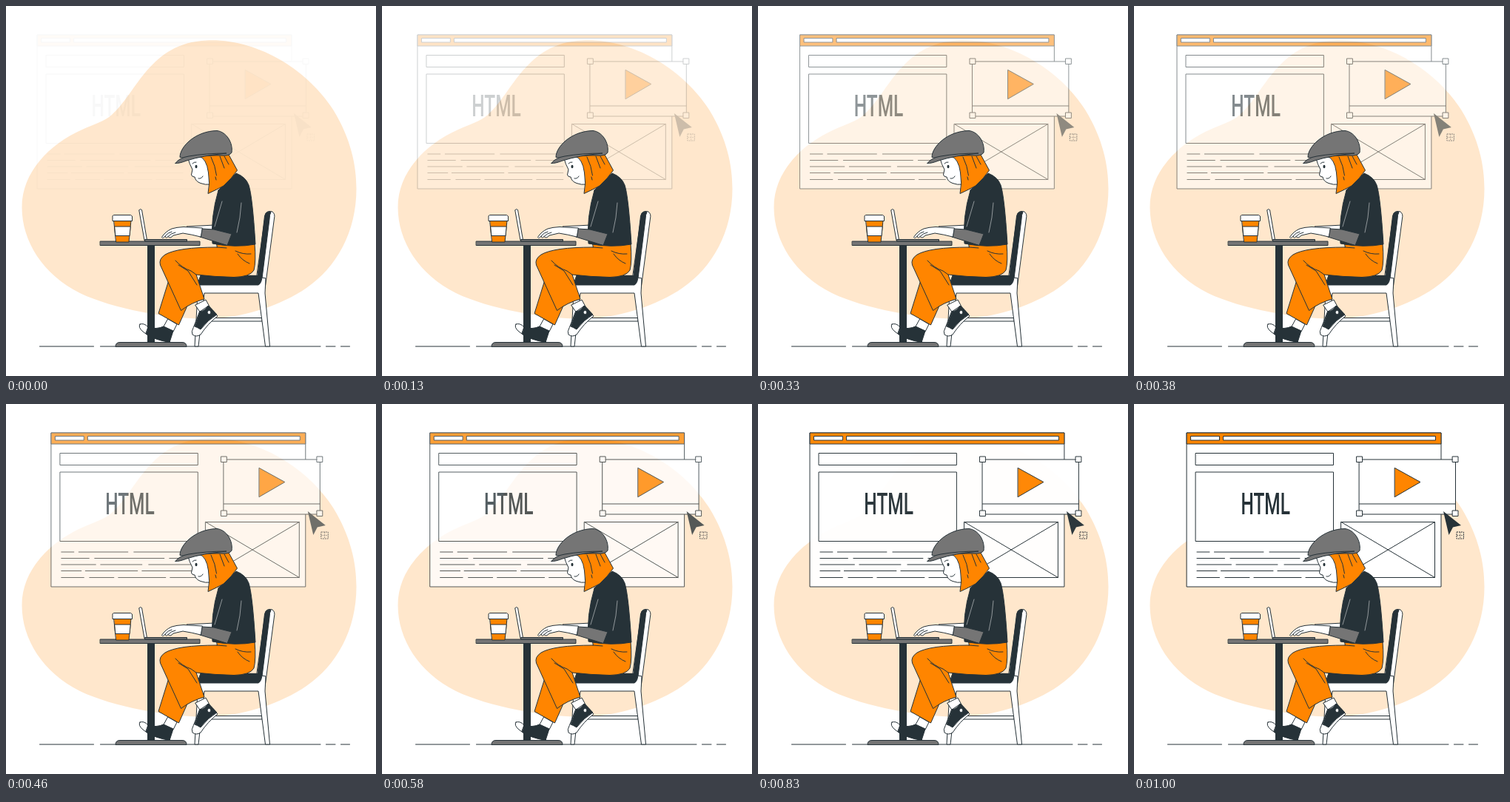
Write an HTML page that moves like this. It is 500 px wide and 500 px high and loops after 1040 ms.

```html
<!DOCTYPE html>
<html lang="en">
<head>
<meta charset="utf-8">
<title>Web designer at work</title>
<style>
  html, body { margin: 0; width: 100%; height: 100%; overflow: hidden; background: #fff; }
  svg { display: block; width: 100vw; height: 100vh; }
  .line { fill: none; stroke: #263238; stroke-width: 1; stroke-linecap: round; stroke-linejoin: round; }
  .white { fill: #fff; }
  .orange { fill: #ff8500; }
  .gray { fill: #757575; }
  .dark { fill: #263238; }
  .bare { stroke: none; }
  .fold { stroke: #fff; stroke-width: .7; stroke-opacity: .7; }
  .dash { stroke-linecap: butt; stroke-dasharray: 2 1; }
  .title { font: 500 40.8px Roboto, "Liberation Sans", sans-serif; fill: #263238; text-anchor: middle; stroke: none; }
</style>
</head>
<body>
<svg viewBox="0 0 500 500">
  <path fill="#ffe7cc" d="M271 46.500C340 43.500 408 87 442 140C466 179 473.500 215 473.500 247C473.500 305 447 353 406 381C371 405 325 419 285 422C240 426 150 412 100 388C50 363 21.500 318 21.500 272C21.500 225 58 187 103 167C118 160 133 156 143 147C177 117 194 50 271 46.500Z"/>

  <g id="page" class="line">
    <path class="white" d="M71.500 39H415V247H71.500Z"/>
    <path class="orange" d="M71.500 39H415V54H71.500Z"/>
    <path class="white" d="M77 43.500H115.500V49H77ZM121 43.500H407.500V49H121Z"/>
    <path d="M83.500 66.500H269.500V82.500H83.500ZM83.500 92H269.500V185.500H83.500Z"/>
    <text class="title" transform="translate(177.700 149) scale(.6 1)">HTML</text>
    <path d="M85 200H102M108.500 200H175M183 200H268M85 208.500H122.500M130 208.500H224M231 208.500H268M85 217H131.500M138 217H194M203 217H268M85 225.500H112M117.500 225.500H188M194 225.500H268M85 234.500H115.500M123 234.500H156M162 234.500H226M232 234.500H268"/>
    <path class="white" d="M280 159.500H406.500V234.500H280ZL406.500 234.500M406.500 159.500L280 234.500"/>
    <path class="white" d="M304.500 75H434.500V149H304.500ZM304.500 135H434.500"/>
    <path class="orange" d="M352.500 86.500L387 105.500L352.500 125.500Z"/>
    <path class="white" d="M301 71H308.500V78.500H301ZM430.500 71H438V78.500H430.500ZM301 144H308.500V151.500H301ZM430.500 144H438V151.500H430.500Z"/>
    <path class="dark bare" d="M418 145L442 164L431 166.500L425.500 177Z"/>
    <path class="dash" d="M436 173H445.500V182H436Z"/>
    <path class="dash" stroke-width=".6" d="M436 177.500H445.500M440.800 173V182"/>
  </g>

  <path class="line" d="M45.500 460H118.500M127.500 460H425M432.500 460H445M452.500 460H464.500"/>

  <g id="chair" class="line">
    <path class="white" d="M264 421.500H346V426H264Z"/>
    <path class="white" d="M351 280Q354 276 360 278Q364 281 362.500 287L350 382L345 385L339 364Z"/>
    <path class="dark" d="M340 364L349.500 284Q351 277 358 278.500Q356 282 356 288L346 368L342 377H258.500L263 364Z"/>
    <path class="white" d="M258 377H341Q345 375 346 367L351 368L350 388L356.500 460H350.500L341 388H268L260 460H255L259 388Z"/>
  </g>

  <g id="woman" class="line">
    <path class="white" d="M181 430Q187 428 192 434L203 439L222 454Q196 450 185 440Q178 434 181 430Z"/>
    <path class="white" d="M219 423L231 430L226 440L213 434Z"/>
    <path class="dark" d="M192 435Q204 437 213 433L226 439L221 454.500Q200 451 189 443Z"/>
    <path class="orange" d="M222 364L206 415.500L233.500 431L258 376Z"/>

    <path class="white" d="M256 404L270 397L276 408L263 414Z"/>
    <path class="white" d="M262 413L274 405L286 419Q273 429 263 444Q257 448 252 444Q250 440 253 435Z"/>
    <path class="dark" d="M262 413Q269 412 273 405Q279 410 285 417Q273 424 263 437Q258 434 255 433Z"/>
    <circle class="white" cx="274.500" cy="414" r="2.500"/>

    <path class="orange" d="M285 322L336 321Q338 345 335 357Q330 366 308 366.500Q282 366 257 363L268 396Q250 401 236.500 411.500L208.500 350Q206 342 215 336Q232 326 285 326Z"/>
    <path d="M229 344Q238 354 250 358L257 363M285 326L298 327M310 331Q320 336 331 335M313 335Q319 344 329 348M233 350L246 358L258 377"/>

    <path class="white" d="M282 296L244 298Q250 305 281 304Z"/>
    <path class="dark" d="M287 249L311 226Q324 231 328 242Q333 257 337 322Q310 327 279 321Q276 286 287 249Z"/>
    <path class="fold" d="M292 264L282 298M318 266Q317 286 312 306"/>
    <path class="gray" d="M265 301L281 302L305 308L299 323.500L262 312Z"/>

    <path class="white" d="M246 206Q248 214 252 221L250.500 228Q251.500 231.500 255 231Q256 237 263 239.500Q270 242 275 241L276 203Z"/>
    <path class="orange" d="M261 203Q271 206 273.500 225Q276 240 273 253.500Q285 248 294 243Q305 233 312.500 222L301 201Z"/>
    <path d="M277 204Q283 216 284.500 229M289 203L295 219M295 203L301 214M283 231L284 235"/>
    <ellipse class="dark bare" cx="257" cy="217" rx="1.500" ry="2.200"/>
    <path d="M252 213Q254 210.500 257 211M260 233Q264 234 266 230"/>
    <path class="gray" d="M235 204C235 190 256 169 285 168.500C298 170 307 185 305 198Q302 203 291 202Q264 201 246 206Z"/>
    <path class="gray" d="M229 212.500Q234 205 247 203Q270 199 298 199Q266 202 244 209Q234 213 229 212.500Z"/>
  </g>

  <g id="desk" class="line">
    <path class="dark bare" d="M191 323H201V456H191Z"/>
    <path class="gray" d="M148 460Q148 454.500 154 454.500H238Q244 454.500 244 460Z"/>
    <path class="gray" d="M127.500 318H262V323.500H127.500Z"/>
    <path class="orange" d="M146 290H169L166 319H149Z"/>
    <path class="white" d="M147 298H168.200L167 310.500H148.200Z"/>
    <path class="white" d="M146 282.500H168.500L170.500 284V290.500H144V284Z"/>
    <path class="white" d="M180 275.500Q182 273.500 183.500 275.500L190.500 316L187.500 317Z"/>
    <path class="gray" d="M188 315.500H244.500V318H188Z"/>
    <path class="white" d="M265 300L240 298.500Q230 299 224 301Q215 305 210.500 312.500Q212 315 215 311Q216 315 219 311.500Q222 315 226 310L239 307Q252 309 263 312Z"/>
    <path d="M215 311Q219 306 224 305M219 311.500Q223 307 229 306"/>
  </g>
</svg>
<script>
  const LOOP = 1040, FPS = 24, SHIFT = 29.9;
  const page = document.getElementById("page");

  // Ease-out, cubic-bezier(0, 0, .58, 1), solved by bisection.
  function easeOut(x) {
    let lo = 0, hi = 1;
    for (let i = 0; i < 24; i++) {
      const t = (lo + hi) / 2;
      if (1.74 * t * t - .74 * t ** 3 < x) lo = t; else hi = t;
    }
    return lo * lo * (3 - 2 * lo);
  }

  // The page slides and fades in at film rate.
  function draw(now) {
    const step = Math.floor((now % LOOP) * FPS / 1000 + .12);
    const shown = easeOut(Math.min(1, (step + .42) / FPS));
    page.setAttribute("transform", `translate(${(shown - 1) * SHIFT} 0)`);
    page.setAttribute("opacity", shown);
  }

  let start;
  function tick(now) {
    start ??= now;
    draw(now - start);
    requestAnimationFrame(tick);
  }
  draw(0);
  requestAnimationFrame(tick);
</script>
</body>
</html>
```
